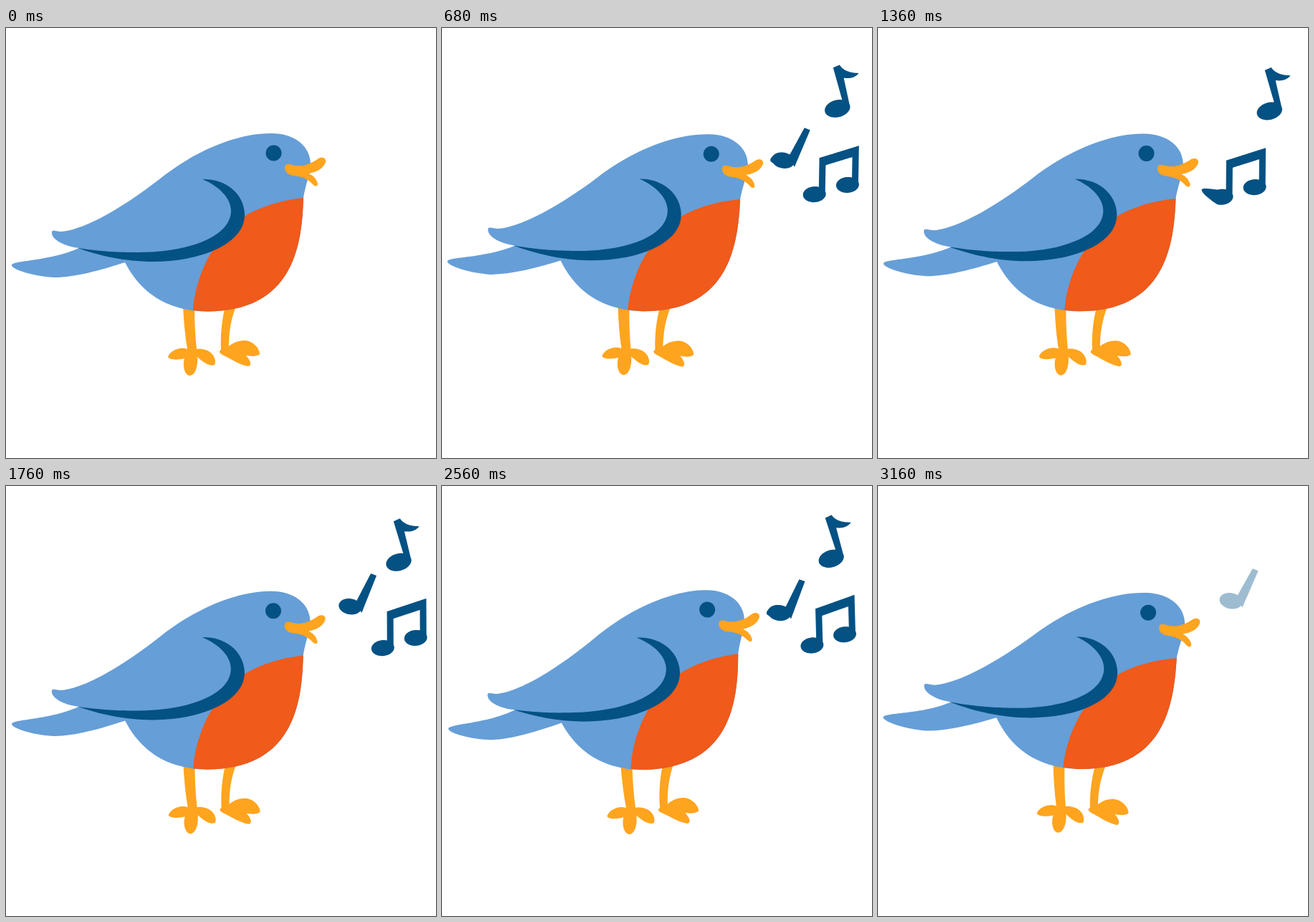
These frames come from a looping animation (600 px wide and 600 px high, 3.2 s). An HTML page:

```html
<!DOCTYPE html>
<html lang="en">
<head>
<meta charset="utf-8">
<title>Singing bird</title>
<style>
html, body { margin: 0; width: 100%; height: 100%; overflow: hidden; background: #fff; }
svg { display: block; width: 100%; height: 100%; }
.blue { fill: #669ed8; }
.navy { fill: #045184; }
.red { fill: #f05a1a; }
.gold { fill: #ffa41e; }
</style>
</head>
<body>
<svg viewBox="0 0 600 600">
  <g id="scene">
    <g id="notes" class="navy"></g>
    <g class="gold">
      <path d="M247 388C248 410 250 430 253 448C243 444 229 450 226 459C229 464 241 463 249 461C246 471 249 485 257 485C265 484 268 470 267 459C274 465 283 473 291 470C295 462 287 446 266 448C264 430 263 410 263 388Z"/>
      <path d="M306 388C301 408 299 428 300 449C295 452 300 455 304 457C316 463 326 470 338 472C343 471 342 465 335 457C342 458 349 459 354 455C354 446 343 436 333 436C323 436 316 440 311 444C311 424 314 406 321 388Z"/>
    </g>
    <path class="blue" d="M64 284C66 281 71 284 78 284C112 281 168 247 214 211C252 180 313 147 370 147C404 147 426 166 425 192C424 206 419 214 415 237C413 300 403 395 281 395.5C215 395 183 360 166 327C132 338 96 348 68 348C40 347 8 337 8 331C8 324 60 326 102 307C82 305 62 295 64 284Z"/>
    <path class="red" d="M415 237C413 300 403 395 281 395.5L261 394C262 370 272 335 288 311L332 263C355 249 385 240 415 237Z"/>
    <path class="navy" d="M274 211C306 210 333 231 333 261C333 300 274 326 205 326C165 326 128 317 100 307C140 313 165 313 185 313C255 313 314 291 314 255C314 238 298 221 274 211Z"/>
    <ellipse id="eye" class="navy" cx="373.5" cy="174.5" rx="11" ry="11"/>
    <path class="gold" d="M389 195C389 190 394 189 399 191C411 195 425 190 436 182C442 179 447 182 446 187C443 196 434 201 422 203C430 206 434 212 435 218C434 222 430 221 427 217C420 210 412 207 402 206C394 205 389 201 389 195Z"/>
  </g>
</svg>
<script>
const LOOP = 3200, STEP = 40;
const MOUTH = [424, 202];
const CYCLES = [80, 1015, 1960];
const SWAY = [[0, 0], [430, 1.95], [1080, -0.95], [1400, 0.5], [2370, -1.95], [3240, 1.7]];
const NS = 'http://www.w3.org/2000/svg';
const $ = id => document.getElementById(id);
const clamp = v => Math.max(0, Math.min(1, v));
const make = () => document.createElementNS(NS, 'path');

// Note head: tilted ellipse centred on x, y
function head(x, y, rx, ry, tilt) {
  const a = tilt * Math.PI / 180, dx = rx * Math.cos(a), dy = rx * Math.sin(a);
  const arc = `A${rx} ${ry} ${tilt} 0 1 `;
  return `M${x - dx} ${y - dy}${arc}${x + dx} ${y + dy}${arc}${x - dx} ${y - dy}Z`;
}

function outline(d) {
  const path = make(), points = [];
  path.setAttribute('d', d);
  const length = path.getTotalLength();
  for (let s = 0; s < length; s++) {
    const p = path.getPointAtLength(s);
    points.push([p.x, p.y]);
  }
  return points;
}

// Positions are of the (left) head; shift is the starting offset from the end position
const notes = [
  { delay: 0, end: [549, 107], shift: [-59, 100], tau: 130, right: 30, rate: 0.5, fade: [760, 880],
    parts: [head(0, 0, 18, 12, -15), 'M-7-57L2-61Q9-50 29-50Q22-41 8-43L17-5L7-10Z'] },
  { delay: 219, end: [533, 226], shift: [-103, 16], tau: 195, right: 62, rate: 0.8, fade: [700, 800],
    parts: [head(0, 0, 16, 11, -5), head(46, -14, 16, 11, -5),
      'M6 0L6-51L61-69L61-14L52-14L52-53L15-41L15 0Z'] },
  { delay: 430, end: [490, 152], shift: [-31, 57], tau: 260, right: 38, rate: 0.5, fade: [690, 820],
    parts: [head(0, 0, 16, 11, 10), 'M29-46L37-43L16 9L8-6Z'] }
];
for (const note of notes) {
  note.outlines = note.parts.map(outline);
  note.paths = CYCLES.map(() => $('notes').appendChild(make()));
}

// The right side of a note leaves the beak first; the rest is still drawn back to the mouth
function drawNote(note, path, age) {
  const alpha = age < 0 ? 0 : 1 - clamp((age - note.fade[0]) / (note.fade[1] - note.fade[0]));
  path.setAttribute('opacity', alpha);
  if (!alpha) return;
  const k = Math.exp(-age / note.tau);
  const [ox, oy] = note.end.map((e, i) => e + note.shift[i] * k);
  const front = note.right - note.rate * age;
  const place = ([x, y]) => {
    const w = clamp((x - front) / 33);
    return [ox + x, oy + y].map((v, i) => (MOUTH[i] + (v - MOUTH[i]) * w).toFixed(2));
  };
  path.setAttribute('d', note.outlines.map(o => 'M' + o.map(place).join('L') + 'Z').join(''));
}

function sway(t) {
  const i = SWAY.findIndex(key => key[0] > t);
  const [t0, a] = SWAY[i - 1], [t1, b] = SWAY[i];
  return a + (b - a) * (1 - Math.cos(Math.PI * (t - t0) / (t1 - t0))) / 2;
}

function draw() {
  const t = Math.floor(performance.now() % LOOP / STEP) * STEP;
  $('scene').setAttribute('transform', `rotate(${sway(t)} 300 300)`);
  $('eye').setAttribute('ry', 11 * Math.max(0.1, clamp(Math.abs(t - 2240) / 73)));
  for (const note of notes)
    CYCLES.forEach((start, i) => drawNote(note, note.paths[i], t - start - note.delay));
  requestAnimationFrame(draw);
}
draw();
</script>
</body>
</html>
```
